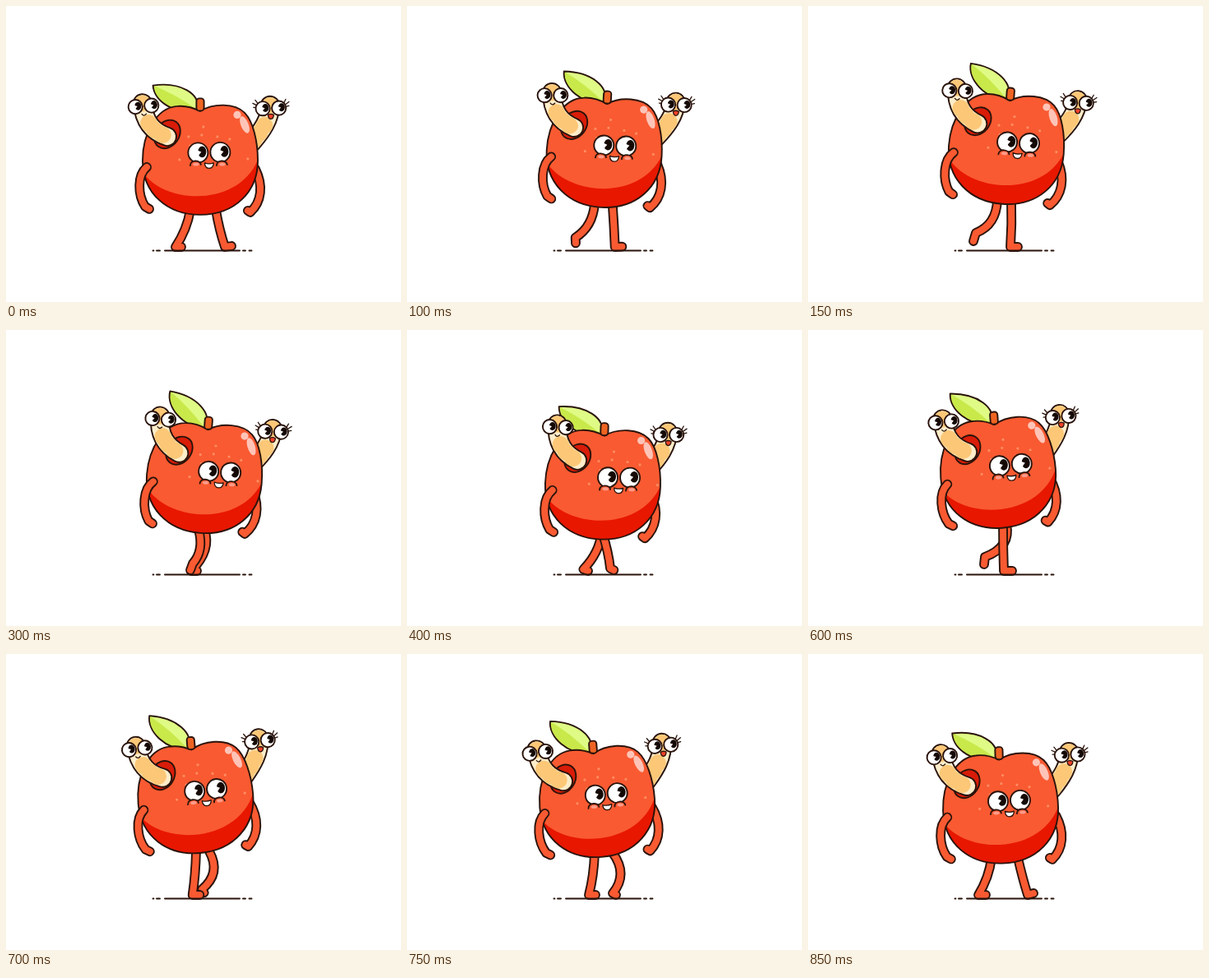
These frames come from a looping animation (480 px wide and 360 px high, 0.9 s). An HTML page without scripts:

```html
<!DOCTYPE html>
<html lang="en">
<head>
<meta charset="utf-8">
<title>Walking apple</title>
<style>
  @property --t { syntax: "<number>"; inherits: true; initial-value: 0; }

  html, body { margin: 0; width: 100%; height: 100%; overflow: hidden; background: #fff; }

  svg {
    display: block; width: 480px; height: 360px;
    --ink: #2a130b; --skin: #f95a31;
    --angle: calc(var(--t) * 360deg);
    --sway: sin(var(--angle));
    --turn: calc(-1 * cos(var(--angle) + 16deg));
    animation: cycle .9s steps(18) -2ms infinite;
  }
  @keyframes cycle { from { --t: 0; } to { --t: 1; } }

  path, circle, ellipse, rect { stroke-linecap: round; stroke-linejoin: round; }
  .ink { stroke: var(--ink); stroke-width: 1.9; }
  .thin { stroke-width: 1.3; }
  .line { fill: none; }

  /* A limb is a wide dark stroke with a narrower coloured one on top. */
  .limb { fill: none; stroke: var(--skin); stroke-width: 8; }
  .edge { stroke: var(--ink); stroke-width: 11.8; }
  .worm { fill: none; stroke: #feedca; stroke-width: 20.4; }
  .worm.edge { stroke: var(--ink); stroke-width: 24.2; }
  .worm.rings { stroke: #fcc877; stroke-width: 20; stroke-linecap: butt; stroke-dasharray: 0 25 1.8 9 1.8 9 1.8 99; }

  .apple {
    transform:
      translate(calc(236px + 6px * var(--sway)), calc(177.3px + 7.5px * cos(2 * var(--angle) + 28deg)))
      rotate(calc(5deg * var(--sway)));
  }
  .front { transform: translateX(calc(4.3px * var(--turn))); }
  .back { transform: translateX(calc(-4px * var(--turn))); }
  .near-arm { transform: translateX(calc(2px * var(--turn))); }
  .lean { transform-origin: -36px -26px; transform: rotate(calc(3deg * var(--turn))); }
  .leaf { transform: translate(-4px, -60px) rotate(calc(35.5deg - 8.5deg * cos(2 * var(--angle) - 8deg))); }

  .far { animation: far .9s -2ms infinite; }
  .near { animation: near .9s -2ms infinite; }
  @keyframes far {
    0%      { d: path("M255 248Q259 272 266 293L274 292"); animation-timing-function: steps(3); }
    16.667% { d: path("M247 236Q248 265 246 293L255 293"); animation-timing-function: steps(3); }
    33.333% { d: path("M241 243Q250 268 225 293L232 293"); animation-timing-function: steps(3); }
    50%     { d: path("M234 248Q226 272 209 290L214 293"); animation-timing-function: steps(1); }
    55.556% { d: path("M233 246Q223 270 209 284L210 292"); animation-timing-function: steps(2); }
    66.667% { d: path("M241 236Q247 264 215 276L214 285"); animation-timing-function: steps(3); }
    83.333% { d: path("M250 242Q269 268 250 291L254 293"); animation-timing-function: steps(2); }
    94.444% { d: path("M255 248Q261 274 267 293L274 291"); animation-timing-function: steps(1); }
    100%    { d: path("M255 248Q259 272 266 293L274 292"); }
  }
  @keyframes near {
    0%      { d: path("M224 248Q220 272 206 293L213 293"); animation-timing-function: steps(3); }
    16.667% { d: path("M230 236Q229 266 204 276L201 286"); animation-timing-function: steps(3); }
    33.333% { d: path("M234 243Q241 268 227 284L224 292"); animation-timing-function: steps(3); }
    50%     { d: path("M239 248Q247 272 257 293L265 292"); animation-timing-function: steps(1); }
    55.556% { d: path("M238 246Q243 272 247 293L257 293"); animation-timing-function: steps(2); }
    66.667% { d: path("M237 236Q237 265 238 293L248 293"); animation-timing-function: steps(3); }
    83.333% { d: path("M228 242Q227 270 221 293L229 293"); animation-timing-function: steps(2); }
    94.444% { d: path("M223 248Q220 272 207 293L216 293"); animation-timing-function: steps(1); }
    100%    { d: path("M224 248Q220 272 206 293L213 293"); }
  }
</style>
</head>
<body>
<svg viewBox="0 0 480 360">
  <defs>
    <path id="body" d="M0-56C-8-60-18-63-28-62C-54-60-70-28-70 4C-70 44-40 70 0 70C42 70 70 42 70 4C70-20 64-44 54-54C42-66 16-66 0-56Z"/>
    <clipPath id="inside"><use href="#body"/></clipPath>
    <path id="far-arm" d="M63 14C73 34 71 54 57 67L54 65"/>
    <path id="near-arm" d="M-63 12C-75 22-74 46-65 60L-60 63"/>
    <path id="left-worm" d="M-64-67C-63-42-51-31-36-25"/>
    <path id="right-worm" d="M81-63C81-46 71-32 59-18"/>
    <path id="leaf" d="M2 2C-4-18-33-19-60 0C-50 17-18 20 2 2Z"/>

    <g id="eye">
      <circle class="ink" r="12" fill="#fff"/>
      <ellipse cx="5" cy="-1" rx="5" ry="6.8" fill="#160a06"/>
      <path d="M-1-3L4-1L0 4Z" fill="#fff"/>
    </g>
    <g id="cheek">
      <path d="M-7 10C-7 3 5 3 6 9Z" fill="#f95a31"/>
      <path class="ink line" d="M-7 10C-7 3 5 3 6 9"/>
      <ellipse cy="8.6" rx="3.8" ry="2" fill="#ff9a88"/>
    </g>
    <g id="worm-eye">
      <circle class="ink" r="8.6" fill="#fff"/>
      <ellipse cx="3.2" cy="-.8" rx="4" ry="5" fill="#160a06"/>
      <path d="M-1.5-2L2.5-.5L-.5 3Z" fill="#fff"/>
    </g>
    <g id="worm-eyes">
      <use href="#worm-eye" x="-9.8" y=".3"/>
      <use href="#worm-eye" x="9.8" y="-.3"/>
    </g>
  </defs>

  <path class="limb edge far"/>
  <path class="limb far"/>
  <path class="limb edge near"/>
  <path class="limb near"/>
  <path class="ink line" d="M178.5 297.5h1M183 297.5h4M193 297.5h91M288 297.5h3M295.5 297.5h3"/>

  <g class="apple">
    <g class="back">
      <use href="#far-arm" class="limb edge"/>
      <use href="#far-arm" class="limb"/>
      <use href="#right-worm" class="worm edge"/>
      <use href="#right-worm" class="worm"/>
      <use href="#right-worm" class="worm rings"/>
      <g transform="translate(82 -59.5)">
        <path class="ink thin line" d="M-16-6l-3-4M-18-4l-4-2M-18-1h-3M16-7l2-4M18-5l4-3M18-2l4-1"/>
        <use href="#worm-eyes"/>
        <path class="ink thin" d="M-3.5 8Q0 6 3.5 8Q3 13 0 13Q-3 13-3.5 8Z" fill="#f0422a"/>
      </g>
    </g>

    <g class="leaf">
      <use href="#leaf" fill="#dffb85"/>
      <path d="M2 2Q-30-3-60 0C-50 17-18 20 2 2Z" fill="#c9e94b"/>
      <use href="#leaf" class="ink line"/>
    </g>

    <use href="#body" fill="#f95a31"/>
    <path d="M-72 14C-50 58 50 64 72-2V80H-72Z" fill="#e81700" clip-path="url(#inside)"/>
    <use href="#body" class="ink line"/>
    <rect class="ink" x="-4.6" y="-71.5" width="9.2" height="15" rx="3.5" fill="#ef6423"/>
    <circle cx="45" cy="-51.5" r="4.6" fill="#ffc4b7"/>
    <ellipse cx="54" cy="-39.5" rx="4.6" ry="11" fill="#ffc4b7" transform="rotate(-22 54 -39.5)"/>

    <g class="front">
      <path d="M8-37h0M-10-25h0M6-27h0M25-25h0M40-22h0M-21 3h0M62 2h0M-8-14h0" stroke="#ff8d62" stroke-width="3.2"/>
      <ellipse class="ink" cx="-36" cy="-28" rx="14.5" ry="18.5" fill="#d81c08" transform="rotate(35 -36 -28)"/>
      <g class="lean">
        <use href="#left-worm" class="worm edge"/>
        <use href="#left-worm" class="worm"/>
        <use href="#left-worm" class="worm rings"/>
        <g transform="translate(-63 -63.5)">
          <use href="#worm-eyes"/>
          <path class="ink thin line" d="M-2.5 9.5Q0 13 3 9.5"/>
        </g>
      </g>

      <use href="#eye" x="1.5" y="-5.5"/>
      <use href="#eye" x="28.5" y="-6"/>
      <use href="#cheek" x="-1"/>
      <use href="#cheek" x="31"/>
      <path class="ink thin" d="M9.5 7Q15 9 20.5 7Q20 13.5 15 13.5Q10 13.5 9.5 7Z" fill="#fff"/>
    </g>

    <g class="near-arm">
      <use href="#near-arm" class="limb edge"/>
      <use href="#near-arm" class="limb"/>
    </g>
  </g>
</svg>
</body>
</html>
```
